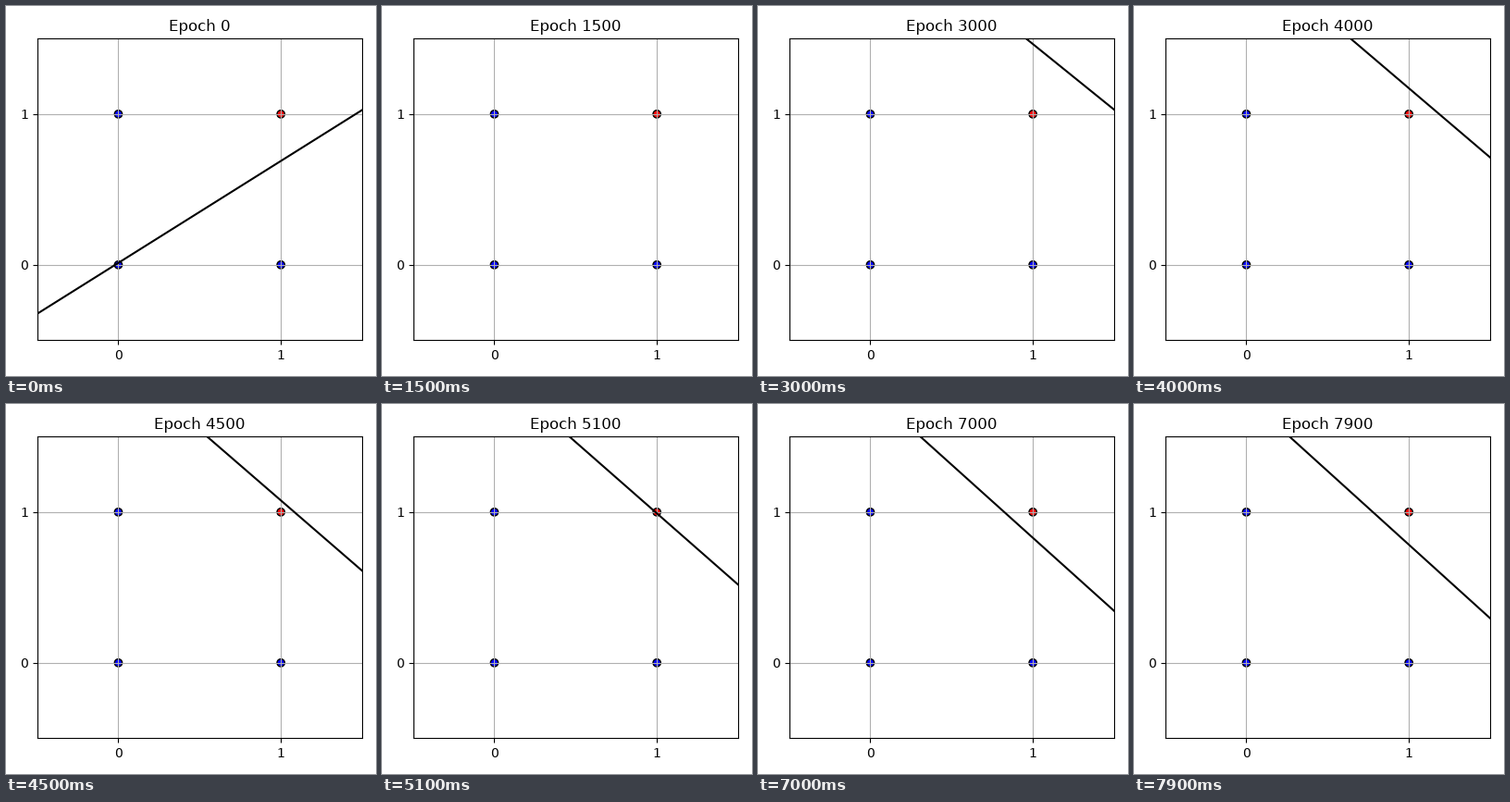
A matplotlib script that plays this animation: 400 px wide and 400 px high, repeating every 8 s.

```python
import numpy as np
import matplotlib.pyplot as plt
from matplotlib.animation import FuncAnimation

FRAMES = 80
EPOCHS_PER_FRAME = 100
RATE = 0.0008

# Logical AND: two inputs, one binary output
inputs = np.array([[0, 0], [0, 1], [1, 0], [1, 1]], dtype=float)
targets = np.array([0, 0, 0, 1], dtype=float)


def train():
    """Logistic regression by gradient descent; one state per frame."""
    w, b = np.array([-0.0476, 0.0704]), -0.0009
    states = []
    for epoch in range(FRAMES * EPOCHS_PER_FRAME):
        if epoch % EPOCHS_PER_FRAME == 0:
            states.append((w[0], w[1], b))
        error = 1 / (1 + np.exp(-(inputs @ w + b))) - targets
        w = w - RATE * (inputs.T @ error)
        b -= RATE * error.sum()
    return states


states = train()
xs = np.array([-0.5, 1.5])

fig, ax = plt.subplots(figsize=(4, 4), dpi=100)
ax.scatter(inputs[:, 0], inputs[:, 1], edgecolors="black",
           c=["red" if t else "blue" for t in targets])
boundary, = ax.plot(xs, xs, color="black")
ax.set(xlim=(-0.5, 1.5), ylim=(-0.5, 1.5), xticks=[0, 1], yticks=[0, 1])
ax.grid(True)
title = ax.set_title("Epoch 0")
fig.tight_layout()
fig.subplots_adjust(top=0.9116)
# The font's own hints keep the title capitals at 12 pixels
plt.rcParams["text.hinting"] = "native"


def update(i):
    w1, w2, b = states[i]
    boundary.set_ydata(-(w1 * xs + b) / w2)
    title.set_text(f"Epoch {i * EPOCHS_PER_FRAME}")
    return boundary, title


anim = FuncAnimation(fig, update, frames=FRAMES, interval=100,
                     repeat=True, repeat_delay=0, blit=False)
plt.show()
```
